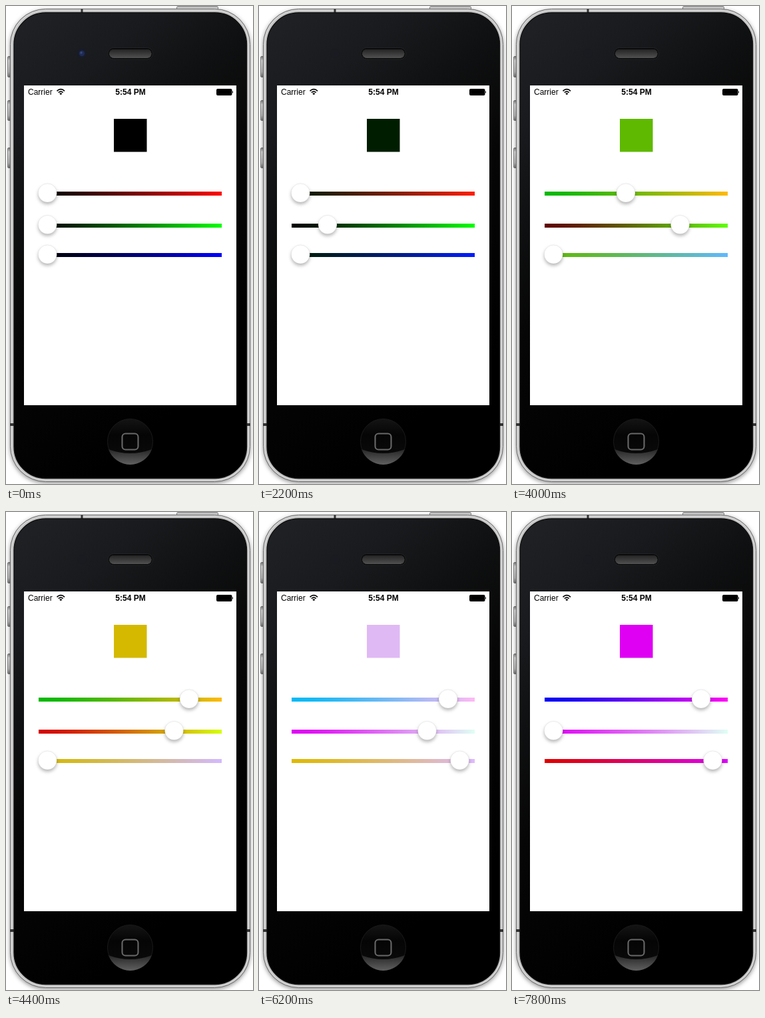
Recreate the animation shown at these times as an HTML page. Size 371 by 716 pixels, loop 8000 ms.

```html
<!DOCTYPE html>
<html lang="en">
<head>
<meta charset="utf-8">
<title>Colour sliders</title>
<style>
html, body { margin: 0; width: 100%; height: 100%; overflow: hidden; background: #fff; }
svg { display: block; }
text { font: 12px "Liberation Sans", Arial, sans-serif; }
.bold { font-weight: bold; }
.knob { filter: drop-shadow(0 3px 2.5px rgba(0,0,0,.28)); }
.case { filter: drop-shadow(0 2px 3px rgba(0,0,0,.42)); }
</style>
</head>
<body>
<svg width="371" height="716" viewBox="0 0 371 716">
  <defs>
    <linearGradient id="glass" gradientUnits="userSpaceOnUse" x1="40" y1="10" x2="420" y2="470">
      <stop offset="0" stop-color="#1f2124"/>
      <stop offset=".2" stop-color="#191a1d"/>
      <stop offset=".38" stop-color="#0f1011"/>
      <stop offset=".6" stop-color="#060606"/>
      <stop offset="1" stop-color="#000"/>
    </linearGradient>
    <linearGradient id="button" x2="0" y2="1">
      <stop offset="0" stop-color="#888"/>
      <stop offset=".2" stop-color="#e6e6e6"/>
      <stop offset=".75" stop-color="#c4c4c4"/>
      <stop offset="1" stop-color="#777"/>
    </linearGradient>
    <linearGradient id="home" x2="0" y2="1">
      <stop offset="0" stop-color="#141414"/>
      <stop offset=".35" stop-color="#050505"/>
      <stop offset="1" stop-color="#0c0c0c"/>
    </linearGradient>
    <linearGradient id="shine" x2="0" y2="1">
      <stop offset="0" stop-color="#262626"/>
      <stop offset="1" stop-color="#606060"/>
    </linearGradient>
    <linearGradient id="shade" x2="0" y2="1">
      <stop offset="0" stop-color="#000" stop-opacity=".55"/>
      <stop offset="1" stop-color="#000" stop-opacity="0"/>
    </linearGradient>
    <pattern id="mesh" width="2" height="2" patternUnits="userSpaceOnUse">
      <rect width="2" height="2" fill="#777"/>
      <path d="M0 0h1v1h-1zM1 1h1v1h-1z" fill="#2a2a2a"/>
    </pattern>
  </defs>

  <rect width="371" height="716" fill="#fff"/>
  <g fill="url(#button)" stroke="#777" stroke-width=".9">
    <rect x="256.5" y=".8" width="62" height="7" rx="1.5"/>
    <rect x="2.5" y="75.5" width="8" height="31" rx="1.5"/>
    <rect x="2.5" y="141.5" width="8" height="30" rx="1.5"/>
    <rect x="2.5" y="212.5" width="8" height="30" rx="1.5"/>
  </g>
  <rect class="case" x="6.5" y="4.5" width="360" height="708" rx="53" fill="#c6c6c6" stroke="#6c6c6c"/>
  <rect x="8.2" y="6.2" width="356.6" height="704.6" rx="51" fill="none" stroke="#dedede"/>
  <path d="M112.5 4.5h3v7h-3zM6 625h7v4h-7zM360 625h7v4h-7z" fill="#333"/>
  <rect x="12" y="10" width="349.5" height="697.5" rx="47.5" fill="url(#glass)" stroke="#111" stroke-width="1.4"/>

  <circle cx="114" cy="71" r="7" fill="#191b21"/>
  <g id="lens">
    <circle cx="114" cy="71" r="7" fill="#171c2b"/>
    <circle cx="114" cy="71" r="4.2" fill="#202b52"/>
    <circle cx="113" cy="70" r="1.7" fill="#35477d"/>
  </g>
  <rect x="153" y="62.5" width="67.5" height="17.5" rx="8.7" fill="#0b0b0c" stroke="#25272a" stroke-width=".8"/>
  <rect x="155" y="65" width="63.5" height="13" rx="6.5" fill="url(#mesh)"/>
  <rect x="155" y="65" width="63.5" height="13" rx="6.5" fill="url(#shade)"/>

  <circle cx="186.5" cy="652.5" r="34" fill="url(#home)" stroke="#1a1a1a"/>
  <path d="M154 664Q186.5 676 219 664A34.5 34.5 0 0 1 154 664Z" fill="url(#shine)"/>
  <rect x="174.5" y="640.5" width="24" height="24" rx="5" fill="none" stroke="#686868" stroke-width="2.1"/>

  <rect x="27" y="119" width="319" height="479" fill="#fff"/>
  <text x="33" y="133">Carrier</text>
  <text class="bold" x="187" y="133" text-anchor="middle">5:54 PM</text>
  <g fill="none" stroke="#000" stroke-width="1.7">
    <path d="M76.5 127.3Q82.3 122 88 127.3"/>
    <path d="M78.8 129.6Q82.3 126.5 85.7 129.6"/>
  </g>
  <path d="M80.2 131.2Q82.3 129.4 84.3 131.2L82.3 133.3Z"/>
  <rect x="316" y="124" width="23.5" height="10" rx="2"/>
  <path d="M340 127.300q2.200 1.700 0 3.500z"/>

  <rect id="swatch" x="162" y="169" width="49.5" height="49.5"/>
  <g id="sliders"></g>
</svg>
<script>
const LOOP = 8000, STEP = 100;
const LEFT = 62.3, SPAN = 248, GAMMA = 1.2, STOPS = 6;
const rows = [{ track: 281, knob: 280 }, { track: 329, knob: 327.5 }, { track: 373, knob: 372 }];

// Each drag: channel, start time, knob x at every step
const drags = [
  [1, 2200, [103, 135, 165, 192, 215, 233, 246, 252.5]],
  [0, 3800, [92, 132, 171, 205, 234, 258, 275, 284]],
  [2, 5400, [76, 112, 152, 190, 225, 255, 278, 293, 301.5]],
  [1, 6800, [241, 217, 187, 156, 126, 100, 80, 67, LEFT]]
];

const byId = id => document.getElementById(id);
function add(parent, tag, attrs) {
  const el = document.createElementNS("http://www.w3.org/2000/svg", tag);
  for (const key in attrs) el.setAttribute(key, attrs[key]);
  return parent.appendChild(el);
}

const sliders = byId("sliders");
rows.forEach((row, i) => {
  const grad = add(sliders, "linearGradient", { id: "track" + i, gradientUnits: "userSpaceOnUse", x1: 49, x2: 324 });
  row.stops = Array.from({ length: STOPS }, (_, n) => add(grad, "stop", { offset: n / (STOPS - 1) }));
  add(sliders, "rect", { x: 49, y: row.track - 3, width: 275, height: 6, fill: `url(#track${i})` });
  row.handle = add(sliders, "circle", {
    class: "knob", cy: row.knob, r: 14, fill: "#fff", stroke: "#000", "stroke-opacity": .13, "stroke-width": .6
  });
});

const level = v => 255 * Math.max(0, v) ** GAMMA;
const rgb = c => `rgb(${c.map(Math.round).join()})`;

function positions(t) {
  const xs = [LEFT, LEFT, LEFT];
  for (const [channel, start, path] of drags) {
    if (t < start) break;
    xs[channel] = path[Math.min(path.length - 1, Math.floor((t - start) / STEP))];
  }
  return xs;
}

function draw(t) {
  const xs = positions(t);
  const color = xs.map(x => level((x - LEFT) / SPAN));
  byId("swatch").setAttribute("fill", rgb(color));
  rows.forEach((row, i) => {
    row.handle.setAttribute("cx", xs[i]);
    row.stops.forEach((stop, n) => {
      const c = color.slice();
      c[i] = level(n / (STOPS - 1));
      stop.setAttribute("stop-color", rgb(c));
    });
  });
  const tick = Math.floor(t / STEP) * STEP;
  const glow = 1 - Math.min(1, Math.max(0, (tick - 300) / 900));
  byId("lens").setAttribute("opacity", glow);
}

const begin = performance.now();
function frame() {
  draw((performance.now() - begin) % LOOP);
  requestAnimationFrame(frame);
}
frame();
</script>
</body>
</html>
```
